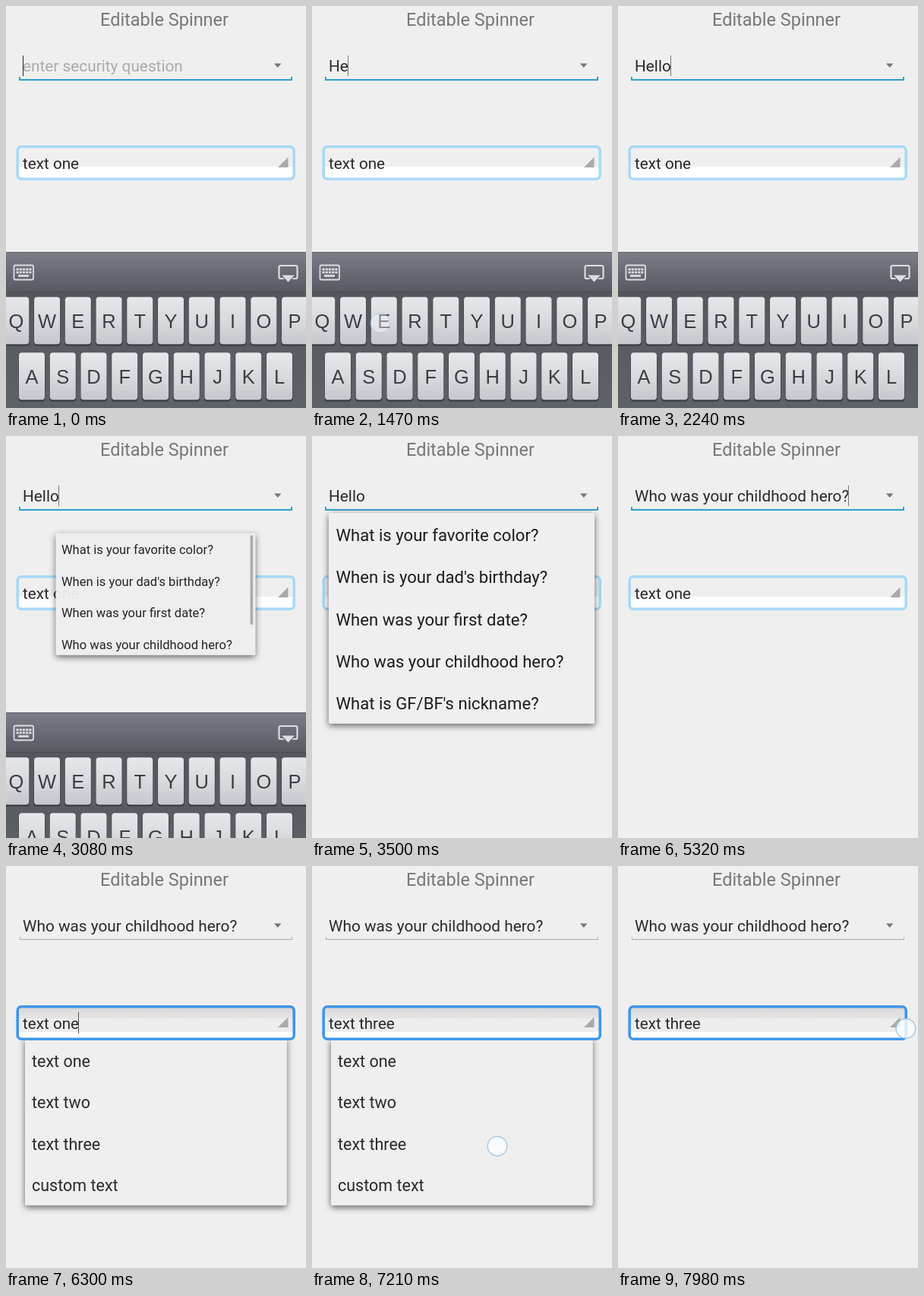
Animation of 395x528 px, one loop 8 s. Source, as an HTML page with a canvas:

```html
<!DOCTYPE html>
<html>
<head>
<meta charset="utf-8">
<title>Editable Spinner</title>
<style>
html, body { margin: 0; width: 100%; height: 100%; overflow: hidden; background: #efefef; }
canvas { display: block; }
</style>
</head>
<body>
<canvas id="stage" width="395" height="528"></canvas>
<script>
const ctx = document.getElementById('stage').getContext('2d');
const LOOP = 8000, STEP = 70;
const QUESTIONS = ['What is your favorite color?', "When is your dad's birthday?",
  'When was your first date?', 'Who was your childhood hero?', "What is GF/BF's nickname?"];
const TEXTS = ['text one', 'text two', 'text three', 'custom text'];

const key = (row, i) => ({ x: (row ? 34 : 13.3) + i * 40.75, y: row ? 486.5 : 413.5 });
// key presses: row, index, start, end
const PRESSES = [[1, 5, 700, 910], [0, 2, 1260, 1470], [1, 8, 1610, 1750],
  [1, 8, 1890, 1960], [0, 8, 2100, 2170]];
// touches: x, y, start, end
const TAPS = PRESSES.map(([row, i, a, b]) => [key(row, i).x - 5, key(row, i).y + 3, a, b]).concat([
  [357, 80, 2730, 2870], [160, 298, 3780, 3990], [345, 213.5, 5950, 6230],
  [244, 368, 7070, 7280], [379, 213.5, 7840, 8100]]);
// times when a caret shows
const CARET1 = [[0, 140], [700, 2590], [2730, 3150], [4200, 4760], [5320, 5810]];
const CARET2 = [[6230, 6650], [7280, 7770]];

const within = (t, spans) => spans.some(([a, b]) => t >= a && t < b);
const ramp = (t, a, b) => Math.min(1, Math.max(0, (t - a) / (b - a)));

function rect(x, y, w, h, fill) {
  ctx.fillStyle = fill;
  ctx.fillRect(x, y, w, h);
}

function round(x, y, w, h, r) {
  ctx.beginPath();
  ctx.roundRect(x, y, w, h, r);
}

function poly(fill, ...pts) {
  ctx.fillStyle = fill;
  ctx.beginPath();
  for (let i = 0; i < pts.length; i += 2) ctx.lineTo(pts[i], pts[i + 1]);
  ctx.fill();
}

function shade(y0, y1, ...colors) {
  const g = ctx.createLinearGradient(0, y0, 0, y1);
  colors.forEach((c, i) => g.addColorStop(i / (colors.length - 1), c));
  return g;
}

function label(str, x, y, size, fill, font = 'Roboto') {
  ctx.font = `${size}px ${font}, sans-serif`;
  ctx.fillStyle = fill;
  ctx.fillText(str, x, y);
  return ctx.measureText(str).width;
}

function questionField(t) {
  const focused = t < 6160;
  const typed = 'Hello'.slice(0, [840, 1330, 1680, 1960, 2170].filter(at => t >= at).length);
  const value = t < 3990 ? typed : QUESTIONS[3];
  const w = label(value || 'enter security question', 22, 86, 20.8, value ? '#2a2a2a' : '#aaa');
  if (within(t, CARET1)) rect(value ? 22 + Math.floor(w - 0.5) : 22, 65, 1, 27, value ? '#777' : '#222');
  if (focused) {
    rect(17, 96, 360, 2, '#2f9fca');
    rect(17, 93, 2, 3, '#2f9fca');
    rect(375, 93, 2, 3, '#2f9fca');
  } else {
    rect(18, 96, 359, 1, '#aaa');
    rect(18, 93, 1, 3, '#b4b4b4');
    rect(376, 93, 1, 3, '#b4b4b4');
  }
  poly('#777', 353, 75.5, 362.5, 75.5, 357.8, 81);
}

function textField(t) {
  const focused = t >= 6160;
  round(15.5, 184.5, 364, 43, 5);
  ctx.fillStyle = '#efefef';
  ctx.fill();
  const edge = focused ? 218 : 211;
  if (focused) {
    rect(17, 186, 361, 14, shade(186, 200, '#d9d9d9', '#e5e5e5'));
    rect(17, 200, 361, 18, '#ededed');
  }
  rect(17, edge, 361, 226 - edge, '#fff');
  round(15.2, 184.7, 364, 42.6, 5);
  ctx.strokeStyle = focused ? '#4096ec' : '#a8d9f8';
  ctx.lineWidth = 3.6;
  ctx.stroke();
  poly('#aaa', 358, 212, 371.5, 198.5, 371.5, 212);
  const w = label(TEXTS[t < 7210 ? 0 : 2], 22, 213.5, 20.7, '#2a2a2a');
  if (within(t, CARET2)) rect(22 + Math.floor(w - 0.5), 192, 1, 28, '#555');
}

function drawKey(row, i, letter, t) {
  const { x, y } = key(row, i);
  const down = PRESSES.some(([r, k, a, b]) => r === row && k === i && t >= a && t < b - STEP);
  round(x - 17.5, y - 29.5, 35, 62.5, 4);
  ctx.fillStyle = '#3a3d43';
  ctx.fill();
  round(x - 17, y - 31.2, 34, 62, 4);
  ctx.fillStyle = down ? shade(y - 30, y + 30, '#b9bcc2', '#a4a7ad')
    : shade(y - 30, y + 30, '#e6e7ea', '#d8dade', '#c6c8cd');
  ctx.fill();
  ctx.textAlign = 'center';
  label(letter, x, y + 9.5, 25.5, '#3b3e44', 'bold 25.5px "Liberation Sans"'.replace('bold 25.5px ', ''));
  ctx.textAlign = 'left';
}

function keyboard(t) {
  const p = ramp(t, 2940, 3260);
  if (p === 1) return;
  ctx.save();
  ctx.translate(0, 205 * p ** 2 * 1.02);
  rect(0, 323, 395, 54, shade(323, 377, '#7b7e86', '#686b73', '#565960'));
  rect(0, 323, 395, 1, '#5d6067');
  rect(0, 376, 395, 152, shade(376, 528, '#54575e', '#5d6168'));
  rect(0, 375, 395, 1, '#484b51');

  ctx.strokeStyle = '#dcdde0';
  ctx.lineWidth = 1.8;
  round(10.5, 340.5, 25.5, 19, 2);
  ctx.stroke();
  for (let r = 0; r < 2; r++)
    for (let c = 0; c < 5; c++) rect(13.5 + c * 4.2, 344.5 + r * 4, 3.2, 2.8, '#dcdde0');
  rect(16, 353, 14, 2.8, '#dcdde0');

  ctx.lineWidth = 2.2;
  round(359.5, 341, 24, 17, 2);
  ctx.stroke();
  poly('#62656c', 360.7, 352, 382.3, 352, 371.5, 365);
  poly('#dcdde0', 363, 353.5, 380, 353.5, 371.5, 362.5);

  [...'QWERTYUIOP'].forEach((c, i) => drawKey(0, i, c, t));
  [...'ASDFGHJKL'].forEach((c, i) => drawKey(1, i, c, t));
  ctx.restore();
}

// The shadow is drawn only outside, so a fading panel keeps its own colour.
function panel(x, y, w, h) {
  ctx.save();
  ctx.beginPath();
  ctx.rect(x - 30, y - 30, w + 60, h + 60);
  ctx.roundRect(x, y, w, h, 2);
  ctx.clip('evenodd');
  ctx.shadowColor = 'rgba(0,0,0,.6)';
  ctx.shadowBlur = 8;
  ctx.shadowOffsetY = 3;
  round(x, y, w, h, 2);
  ctx.fillStyle = '#efefef';
  ctx.fill();
  ctx.restore();
  round(x, y, w, h, 2);
  ctx.fillStyle = '#efefef';
  ctx.fill();
  ctx.clip();
}

function questionPopup(t) {
  const open = ramp(t, 2940, 3220), gone = ramp(t, 3990, 4200);
  if (!open || gone === 1) return;
  const h = 213 + 63.5 * ramp(t, 3220, 3430);
  const cx = 197, cy = 101 + h / 2, scale = (0.5 + 0.5 * open) * (1 - 0.1 * gone);
  ctx.save();
  ctx.globalAlpha = Math.min(1, open * 1.92) * (1 - gone);
  ctx.translate(cx, cy);
  ctx.scale(scale, scale);
  ctx.translate(-cx, -cy);
  panel(22, 101, 350, h);
  if (t >= 3780 && t < 3990) rect(22, 268, 350, 55, '#d5e6ee');
  QUESTIONS.forEach((q, i) => label(q, 31.5, 138 + i * 55.25, 22.1, '#1c1c1c'));
  if (t < 3430) rect(363, 105, 5, 156, '#aaa');
  ctx.restore();
}

function textPopup(t) {
  const open = ramp(t, 6090, 6300), gone = ramp(t, 7210, 7420);
  if (!open || gone === 1) return;
  ctx.save();
  ctx.globalAlpha = open * (1 - gone);
  ctx.beginPath();
  ctx.rect(0, 229, 395, 299);
  ctx.clip();
  ctx.translate(197, 229);
  ctx.scale(0.8 + 0.2 * open, 0.8 + 0.2 * open);
  ctx.translate(-197, -229);
  panel(25, 226, 344.5, 219.5);
  TEXTS.forEach((s, i) => label(s, 34, 264 + i * 54.4, 21.5, '#2a2a2a'));
  ctx.restore();
}

function touches(t) {
  for (const [x, y, a, b] of TAPS) {
    if (t < a || t >= b + STEP) continue;
    ctx.save();
    ctx.globalAlpha = 1 - ramp(t, b - STEP, b + STEP);
    ctx.beginPath();
    ctx.arc(x, y, 12.8, 0, 7);
    ctx.fillStyle = 'rgba(250,252,254,.82)';
    ctx.fill();
    ctx.strokeStyle = 'rgba(150,190,222,.8)';
    ctx.lineWidth = 1.4;
    ctx.stroke();
    ctx.restore();
  }
}

function draw(now) {
  const t = Math.floor((now % LOOP) / STEP) * STEP;
  rect(0, 0, 395, 528, '#efefef');
  label('Editable Spinner', 124, 25.5, 23.5, '#777');
  questionField(t);
  textField(t);
  keyboard(t);
  questionPopup(t);
  textPopup(t);
  touches(t);
}

let start;
function frame(now) {
  start ??= now;
  draw(now - start);
  requestAnimationFrame(frame);
}
draw(0);
requestAnimationFrame(frame);
</script>
</body>
</html>
```
